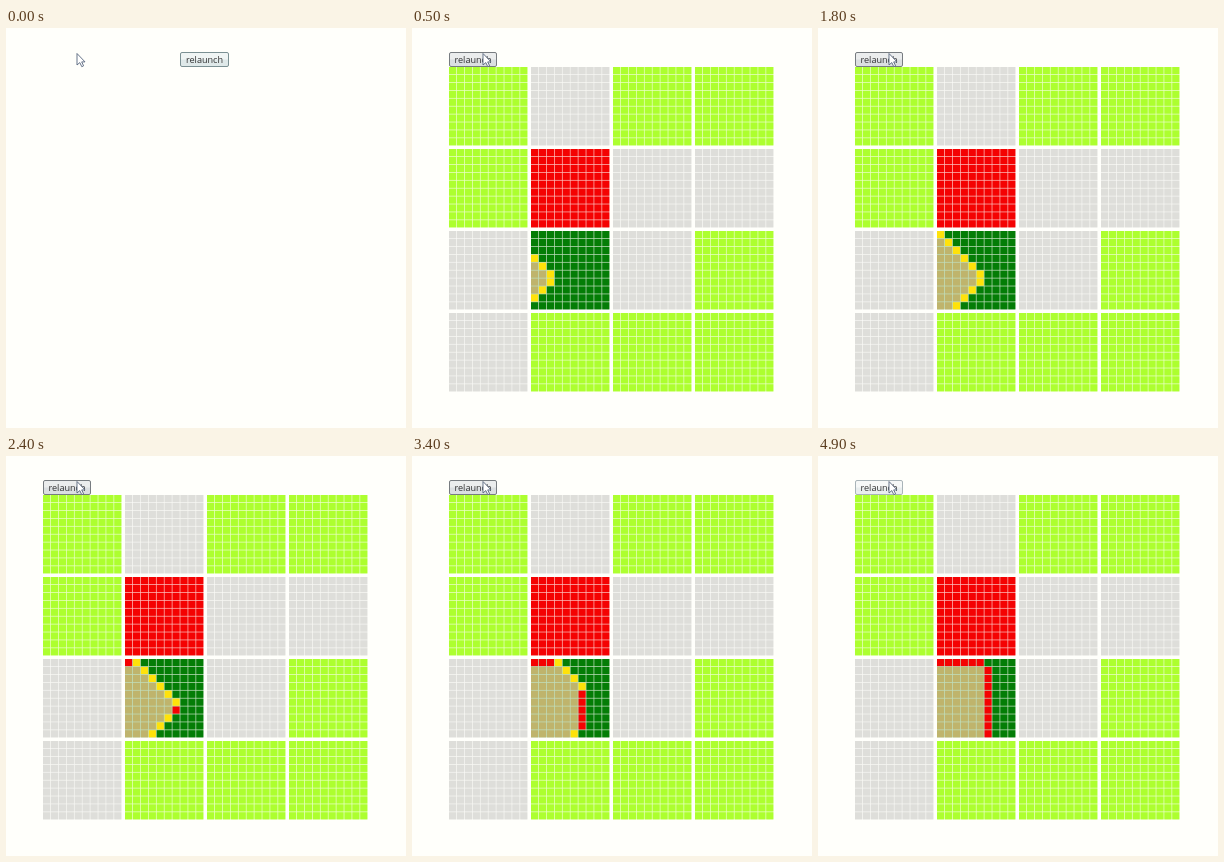
An HTML page with a canvas that plays this animation: 400x400 px, repeating every 5000 ms.

```html
<!DOCTYPE html>
<html lang="en">
<head>
<meta charset="utf-8">
<title>Flood fill</title>
<style>
  html, body { margin: 0; width: 100%; height: 100%; overflow: hidden; background: #fffffb; }
  canvas, svg { position: absolute; left: 0; top: 0; width: 400px; height: 400px; }
  .button {
    position: absolute; left: 37px; top: 24px; width: 48px; height: 15px;
    box-sizing: border-box; border: 1px solid #777c80; border-radius: 2px;
    background: linear-gradient(#ebeded 45%, #dbdfe1 55%);
    font: 9.1px/13px "Open Sans", "Noto Sans", sans-serif;
    color: #333; text-align: center; white-space: nowrap;
  }
  .button.light { border-color: #a9b4b8; background: linear-gradient(#f6f8f7 45%, #e9eeee 55%); }
  .button.idle { left: 174px; width: 49px; border-color: #7b9093; background: linear-gradient(#f0f5f4 45%, #dfe9e9 55%); }
</style>
</head>
<body>
<canvas id="grid" width="400" height="400"></canvas>
<div id="button" class="button idle">relaunch</div>
<svg viewBox="0 0 400 400">
  <path d="M71 25.5V37L73.8 34.6L75.8 38.7L77.6 37.8L75.7 33.9H79Z"
        fill="#fff" stroke="#56657c" stroke-width="0.9" stroke-linejoin="round"/>
</svg>
<script>
const LOOP = 5000, TICK = 100;
const GRID_AT = 100, FILL_AT = 163, STEP = 55, LIGHT_AT = 4500;
// Grid units: 10 wide cells, 1 wide gaps, blocks 114 apart.
const LEFT = 37, TOP = 39, SCALE = 82 / 114;
const BLOCK = 114, PITCH = 11, SIZE = 10, N = 10, WIDTH = N * PITCH - 1;
const GAP_TINT = 0.25;
const SEED = 6, WALL = 6;
const BLOCKS = ["LGLL", "LRGG", "GFGL", "GLLL"];
const COLORS = {
  L: "#adff2f", G: "#dededa", R: "#f40202", F: "#047d06",
  open: "#ffe20a", done: "#bfb46c"
};

const ctx = document.getElementById("grid").getContext("2d");
const button = document.getElementById("button");

const key = (r, c) => r * N + c;
const isWall = (r, c) => r === 0 || c === WALL;
const neighbours = (r, c) =>
  [[r - 1, c], [r + 1, c], [r, c - 1], [r, c + 1]]
    .filter(([y, x]) => y >= 0 && y < N && x >= 0 && x < N);

// Breadth-first order: by distance from the seed, then from top to bottom.
function fillOrder() {
  const order = [], seen = new Set([key(SEED, 0)]);
  let ring = [[SEED, 0]];
  while (ring.length) {
    ring.sort((a, b) => a[0] - b[0]);
    order.push(...ring);
    const next = [];
    for (const [r, c] of ring) {
      if (isWall(r, c)) continue;
      for (const [y, x] of neighbours(r, c)) {
        if (seen.has(key(y, x))) continue;
        seen.add(key(y, x));
        next.push([y, x]);
      }
    }
    ring = next;
  }
  return order;
}
const ORDER = fillOrder();

function fillState(count) {
  const state = { [key(SEED, 0)]: "open" };
  for (const [r, c] of ORDER.slice(0, count)) {
    state[key(r, c)] = isWall(r, c) ? "R" : "done";
    if (isWall(r, c)) continue;
    for (const [y, x] of neighbours(r, c)) state[key(y, x)] ||= "open";
  }
  return state;
}

function drawBlock(x, y, kind, state) {
  ctx.globalAlpha = GAP_TINT;
  ctx.fillStyle = COLORS[kind];
  ctx.fillRect(x, y, WIDTH, WIDTH);
  ctx.globalAlpha = 1;
  for (let r = 0; r < N; r++) {
    for (let c = 0; c < N; c++) {
      ctx.fillStyle = COLORS[state[key(r, c)] || kind];
      ctx.fillRect(x + c * PITCH, y + r * PITCH, SIZE, SIZE);
    }
  }
}

function draw(t) {
  ctx.clearRect(0, 0, 400, 400);
  button.className = t < GRID_AT ? "button idle" : t < LIGHT_AT ? "button" : "button light";
  if (t < GRID_AT) return;
  const state = fillState(Math.max(0, Math.floor((t - FILL_AT) / STEP)));
  ctx.save();
  ctx.translate(LEFT, TOP);
  ctx.scale(SCALE, SCALE);
  BLOCKS.forEach((row, j) => [...row].forEach((kind, i) =>
    drawBlock(i * BLOCK, j * BLOCK, kind, kind === "F" ? state : {})));
  ctx.restore();
}

const start = performance.now();
let shown = -1;
function frame() {
  const elapsed = (performance.now() - start) % LOOP;
  const t = Math.floor(elapsed / TICK) * TICK;
  if (t !== shown) draw(shown = t);
  requestAnimationFrame(frame);
}
frame();
</script>
</body>
</html>
```
